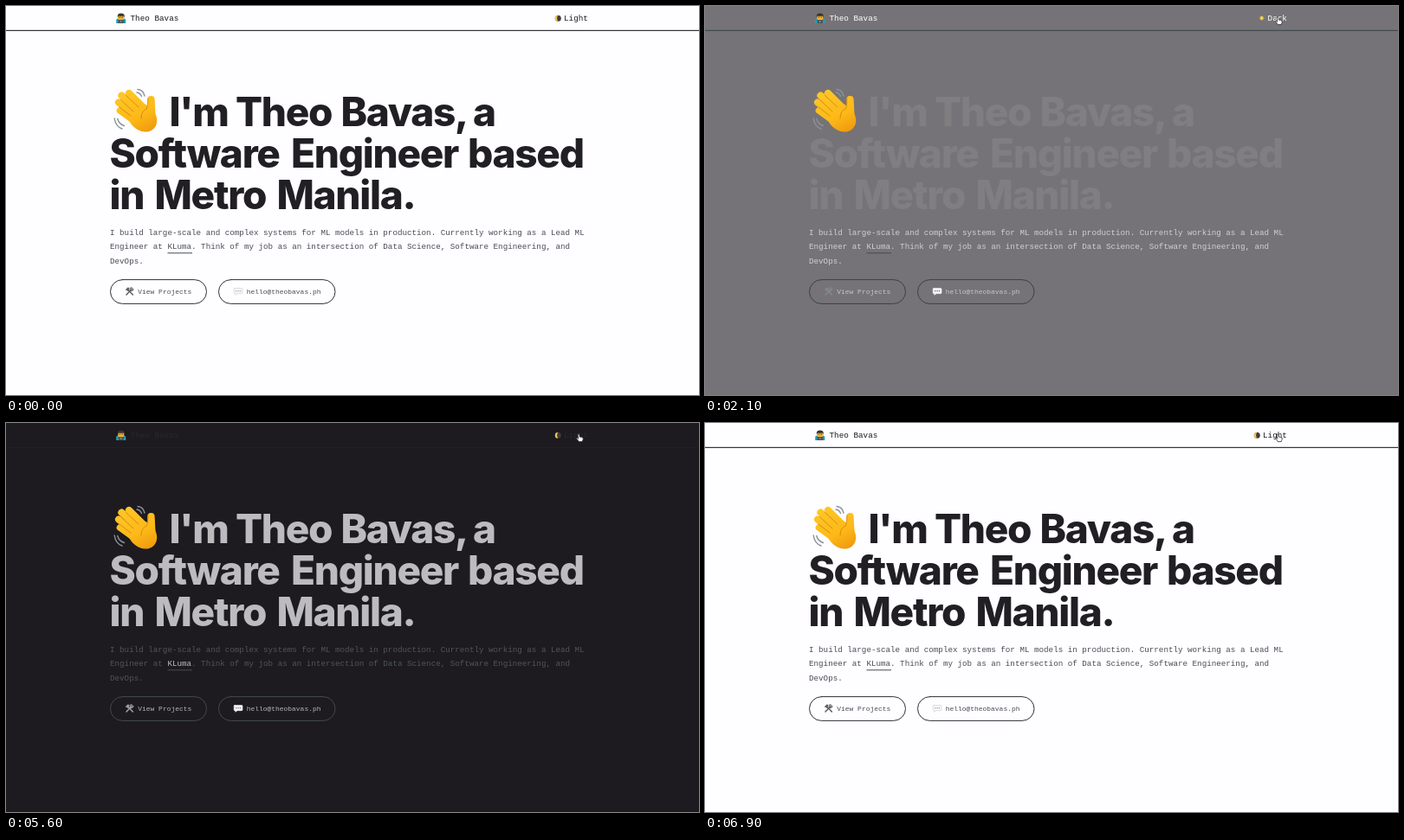
An HTML page with a canvas for the animation above (8000 ms loop, 800x450 px).

```html
<!DOCTYPE html>
<html lang="en">
<head>
<meta charset="utf-8">
<title>Portfolio theme toggle</title>
<style>
html, body { margin: 0; width: 100%; height: 100%; overflow: hidden; background: #fefdff; }
canvas { display: block; width: 800px; height: 450px; }
</style>
</head>
<body>
<canvas id="stage" width="800" height="450"></canvas>
<script>
const ctx = document.getElementById('stage').getContext('2d');
const LOOP = 8000, STEP = 100;
const TO_DARK = 1900, TO_LIGHT = 5600;
const MONO = '"Liberation Mono", "Noto Sans Mono", monospace';
const SANS = 'Inter, Roboto, sans-serif';

// light and dark value of each themed colour
const COLORS = {
  page: [[254, 253, 255], [28, 25, 31]],
  title: [[33, 31, 35], [189, 188, 190]],
  header: [[29, 27, 31], [255, 255, 255]],
  rule: [[32, 30, 34], [62, 72, 76]],
  body: [[72, 77, 84], [205, 208, 212]],
  button: [[72, 77, 84], [196, 198, 202]],
  border: [[46, 49, 54], [66, 74, 79]],
  tool: [[92, 96, 100], [160, 163, 167]],
  bubble: [[246, 246, 248], [244, 245, 247]],
  bubbleEdge: [[205, 206, 210], [244, 245, 247]],
  dots: [[150, 152, 156], [70, 72, 76]]
};

const clamp = v => Math.min(1, Math.max(0, v));
const mix = (a, b, k) => a + (b - a) * k;

// the CSS "ease" curve
function ease(x) {
  x = clamp(x);
  const bez = (a, b, u) => 3 * a * u * (1 - u) ** 2 + 3 * b * u * u * (1 - u) + u ** 3;
  let lo = 0, hi = 1;
  for (let i = 0; i < 24; i++) {
    const mid = (lo + hi) / 2;
    if (bez(0.25, 0.25, mid) < x) lo = mid; else hi = mid;
  }
  return bez(0.1, 1, lo);
}

// how dark each group is: the page fades slowly, text fades fast
function themeAt(t) {
  if (t < TO_DARK) return { page: 0, link: 0, text: 0, dark: false };
  const back = t >= TO_LIGHT;
  const age = t - (back ? TO_LIGHT : TO_DARK);
  const page = back ? ease((age + 10) / 940) : ease((age + 25) / 640);
  const link = clamp((age + 30) / 230);
  const text = clamp(0.94 + age / 1000);
  return back
    ? { page: 1 - page, link: 1 - link, text: 1 - text, dark: false }
    : { page, link, text, dark: true };
}

function color(name, k) {
  const [a, b] = COLORS[name];
  return `rgb(${a.map((v, i) => Math.round(mix(v, b[i], k))).join(',')})`;
}

function text(str, x, y, font, fill, spacing = 0) {
  ctx.font = font;
  ctx.letterSpacing = spacing + 'px';
  ctx.fillStyle = fill;
  ctx.fillText(str, x, y);
}

function disc(x, y, r, fill) {
  ctx.fillStyle = fill;
  ctx.beginPath();
  ctx.arc(x, y, r, 0, 7);
  ctx.fill();
}

function oval(x, y, rx, ry, turn, fill) {
  ctx.fillStyle = fill;
  ctx.beginPath();
  ctx.ellipse(x, y, rx, ry, turn, 0, 7);
  ctx.fill();
}

function line(x1, y1, x2, y2, width, stroke) {
  ctx.strokeStyle = stroke;
  ctx.lineWidth = width;
  ctx.beginPath();
  ctx.moveTo(x1, y1);
  ctx.lineTo(x2, y2);
  ctx.stroke();
}

function shape(d, fill, stroke, width = 1) {
  const p = new Path2D(d);
  if (fill) { ctx.fillStyle = fill; ctx.fill(p); }
  if (stroke) { ctx.strokeStyle = stroke; ctx.lineWidth = width; ctx.stroke(p); }
}

function wavingHand() {
  const skin = ctx.createLinearGradient(138, 100, 162, 146);
  skin.addColorStop(0, '#ffc526');
  skin.addColorStop(0.6, '#fdb918');
  skin.addColorStop(1, '#f09c0e');
  const crease = '#d88c0c', air = '#89929a';
  ctx.lineCap = 'round';
  ctx.lineJoin = 'round';
  shape('M152 96.5 Q158.5 97 160 104 M151 100 Q155 100.5 156.5 104.5', null, air, 1.4);
  shape('M125.2 130 Q126.5 139.5 134 142 M128.8 130.5 Q130.2 136.5 136.500 138.5', null, air, 1.4);
  line(168.5, 127, 167.5, 108, 8.2, skin);
  oval(157.5, 129, 18.3, 14.8, 0.75, skin);
  line(160, 119, 142, 101, 8.2, skin);
  line(154, 122, 133.5, 103.5, 8.2, skin);
  line(150, 127, 130, 111.5, 8, skin);
  line(148, 133, 131.5, 121, 7.6, skin);
  shape('M138.5 103.5 L153 117 M132.5 108.5 L147 122 M131 117 L144 127', null, crease, 1);
  shape('M164 107 Q164 114 162.5 119 Q156 121 156 130', null, crease, 1);
}

function coder() {
  shape('M127.2 20 V16.6 Q127.2 14.6 129.4 14.6 H136 Q138.3 14.6 138.3 16.6 V20 Z', '#22a3b5');
  oval(132.8, 12.8, 3.7, 3.9, 0, '#f3b52f');
  shape('M129 13.5 Q127.8 8.6 132.8 8.6 Q137.8 8.6 136.6 13.5 L135.6 11.5 Q132.5 12 130 11.4 Z', '#3f312a');
  ctx.fillStyle = '#403a36';
  ctx.fillRect(130.7, 12.6, 1.4, 1);
  ctx.fillRect(133.5, 12.6, 1.4, 1);
  shape('M129.2 16 H136.4 L136 20 H129.6 Z', '#50575c');
  disc(132.8, 17.9, 0.6, '#c9ced1');
}

function moon() {
  disc(637.3, 14.2, 3.5, '#403b35');
  shape('M637.3 10.7 A3.5 3.5 0 0 0 637.3 17.7 Q634.9 14.2 637.3 10.7 Z', '#f0c75a');
}

function sun() {
  ctx.lineCap = 'butt';
  for (let i = 0; i < 8; i++) {
    const a = i * Math.PI / 4, c = Math.cos(a), s = Math.sin(a);
    line(642.7 + c * 1.5, 14 + s * 1.5, 642.7 + c * 3, 14 + s * 3, 0.8, '#e8a22c');
  }
  disc(642.7, 14, 1.9, '#fbd148');
}

function tools(fill) {
  ctx.lineCap = 'round';
  line(139, 334, 144.8, 328, 1.5, fill);
  shape('M147 327.5 A2 2 0 1 1 145.3 325.7 L144.7 327.7 Z', null, fill, 1);
  line(141, 328.5, 146.4, 334, 1.6, fill);
  shape('M137.6 328.6 L140.5 325.6 L142.8 325.9 L141.8 327.1 L142.2 328.5 L140.4 330 L139.3 328.8 Z', fill);
}

function bubble(k) {
  shape('M264 326.5 H272 Q273 326.5 273 327.5 V331.7 Q273 332.7 272 332.7 H267 L264.8 334.3 V332.7 H264 Q263.2 332.7 263.2 331.7 V327.5 Q263.2 326.5 264 326.5 Z',
    color('bubble', k), color('bubbleEdge', k), 0.6);
  for (let i = 0; i < 3; i++) disc(265.8 + i * 2.3, 329.7, 0.65, color('dots', k));
}

function cursor(t) {
  if (t < STEP) return;
  const far = ease((t - 100) / 800), near = ease((t - 900) / 400);
  const x = mix(mix(718, 671, far), 661, near);
  const y = mix(mix(292, 22, far), 13, near);
  ctx.save();
  ctx.translate(x, y);
  ctx.lineJoin = 'round';
  if (t < 1000) {
    shape('M0 0 V8.6 L2 6.8 L3.4 9.8 L4.7 9.2 L3.4 6.3 H6 Z', '#111', '#fff', 0.7);
  } else {
    shape('M-.9 .7 Q-.8 -.3 0 -.2 Q.9 -.2 1 .7 L1.3 3.2 Q2.3 2.6 2.8 3.5 Q3.7 3 4.1 3.9 Q5.3 3.6 5.3 4.9 Q5.3 6.6 4.3 7.8 V8.6 H.2 Q-.3 7.2 -2 5.4 Q-2.7 4.3 -1.9 4 Q-1.1 3.8 -.4 5 Z',
      '#fff', '#29272b', 0.8);
  }
  ctx.restore();
}

function header(th) {
  const ink = color('header', th.text), font = '9.3px ' + MONO;
  ctx.fillStyle = color('rule', th.text);
  ctx.fillRect(0, 27.8, 800, 1.1);
  coder();
  text('Theo Bavas', 143.5, 17, font, ink);
  if (th.dark) sun(); else moon();
  text(th.dark ? 'Dark' : 'Light', th.dark ? 649.6 : 644, 17, font, ink);
}

function title(th) {
  const ink = color('title', th.page);
  const words = [
    [139, ["I'm", 188.5], ['Theo', 265], ['Bavas,', 386.5], ['a', 539]],
    [187, ['Software', 119.5], ['Engineer', 329], ['based', 533]],
    [235, ['in', 119.5], ['Metro', 171.5], ['Manila.', 312.5]]
  ];
  for (const [y, ...row] of words)
    for (const [w, x] of row) text(w, x, y, '800 46px ' + SANS, ink, -1.3);
}

function intro(th) {
  const font = '9.23px ' + MONO, ink = color('body', th.text), left = 120;
  text('I build large-scale and complex systems for ML models in production. Currently working as a Lead ML', left, 265, font, ink);
  const parts = [
    ['Engineer at ', ink],
    ['KLuma', color('body', th.link)],
    ['. Think of my job as an intersection of Data Science, Software Engineering, and', ink]
  ];
  let x = left;
  for (const [str, fill] of parts) {
    text(str, x, 281.2, font, fill);
    x += ctx.measureText(str).width;
  }
  text('DevOps.', left, 297.5, font, ink);
  ctx.fillStyle = 'rgb(70,74,80)';
  ctx.fillRect(186.5, 285.3, 28.5, 1);
}

function buttons(th) {
  const font = '7.95px ' + MONO, ink = color('button', th.link);
  ctx.strokeStyle = color('border', th.page);
  ctx.lineWidth = 1;
  for (const [x, w] of [[120.5, 111], [245.5, 134.5]]) {
    ctx.beginPath();
    ctx.roundRect(x, 316.6, w, 27.8, 13.9);
    ctx.stroke();
  }
  tools(color('tool', th.page));
  bubble(th.link);
  text('View Projects', 152.3, 332.6, font, ink);
  text('hello@theobavas.ph', 277.7, 332.6, font, ink);
}

function draw(t) {
  const th = themeAt(t);
  ctx.fillStyle = color('page', th.page);
  ctx.fillRect(0, 0, 800, 450);
  header(th);
  wavingHand();
  title(th);
  intro(th);
  buttons(th);
  cursor(t);
}

const start = performance.now();
function tick() {
  const t = (performance.now() - start) % LOOP;
  draw(Math.floor(t / STEP) * STEP);
  requestAnimationFrame(tick);
}
tick();
</script>
</body>
</html>
```
